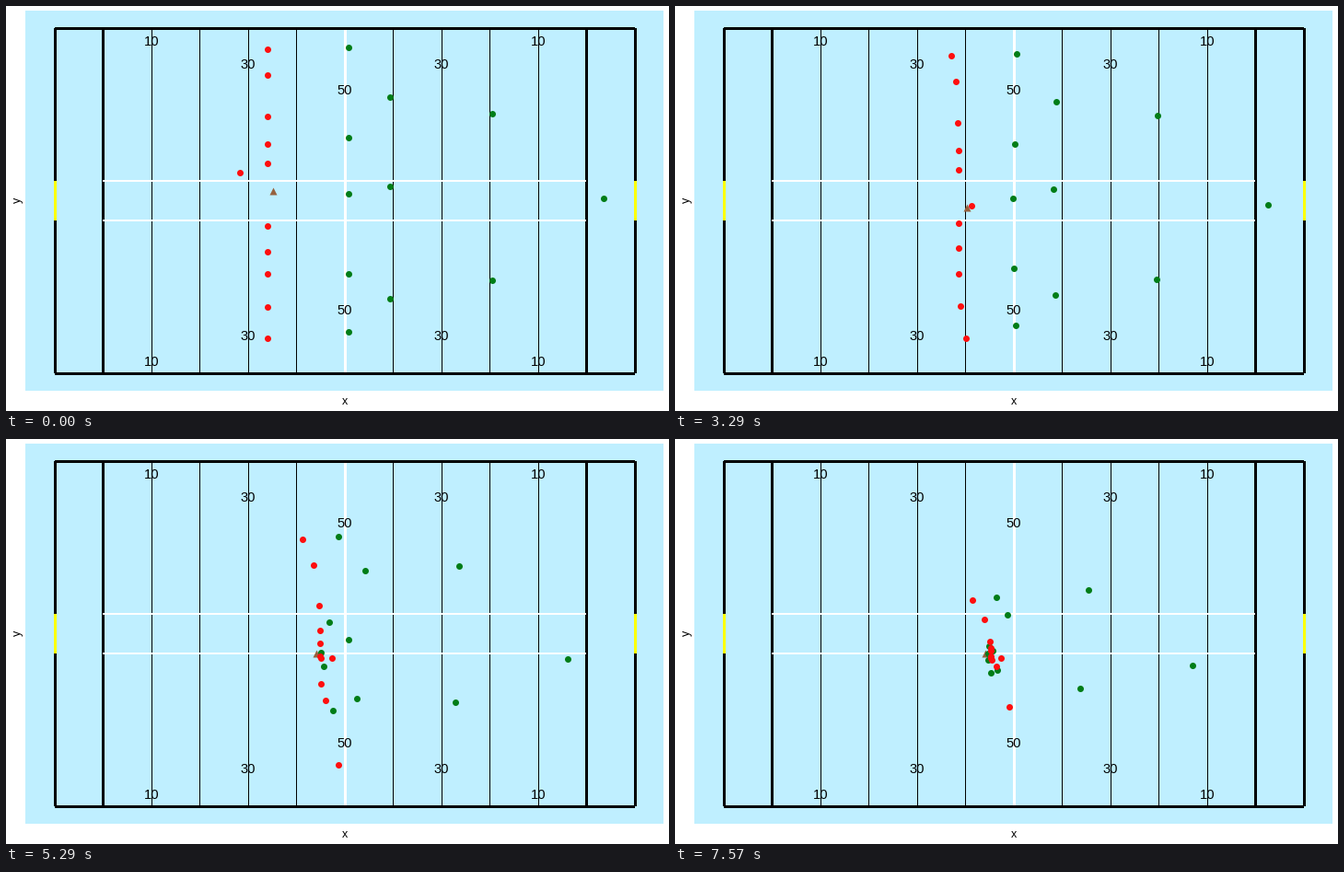
A matplotlib script that plays this animation: 720 by 440 pixels, repeating every 7710 ms.

```python
import numpy as np
import matplotlib.pyplot as plt
from matplotlib.animation import FuncAnimation
from matplotlib.patches import Rectangle

W, H, DPI = 720, 440, 100
LOOP, POSES, TICK = 7710, 54, 30      # ms, poses per loop, ms per frame
PX = 72 / DPI
RED, GREEN, BROWN = "#ff0e0e", "#007d17", "#96623f"

plt.rcParams["font.family"] = "Liberation Sans"
fig = plt.figure(figsize=(W / DPI, H / DPI), dpi=DPI, facecolor="white")
ax = fig.add_axes([0, 0, 1, 1])
ax.set(xlim=(0, W), ylim=(H, 0))
ax.axis("off")


# ---- field ----

def box(x0, y0, x1, y1, color):
    ax.add_patch(Rectangle((x0, y0), x1 - x0, y1 - y0, fc=color, lw=0,
                           antialiased=False))


def label(x, y, text):
    ax.text(x, y + 5, text, size=14.7 * PX, ha="center", va="baseline", zorder=2)


def yard_x(yards):
    return int(53 + 5.25 * yards)


def draw_field():
    box(21, 5, 714, 418, "#bfefff")
    for yards in range(20, 110, 10):
        if yards != 60:
            box(yard_x(yards), 24, yard_x(yards) + 1, 399, "black")
    box(367, 24, 370, 399, "white")
    for x in (52, 104, 629, 682):
        box(x, 24, x + 3, 399, "black")
    for y in (23, 398):
        box(53, y, 683, y + 3, "black")
    for y in (189, 232):
        box(105, y, 630, y + 2, "white")
    for x in (52, 682):
        box(x, 190, x + 3, 233, "yellow")

    for yards, top, bottom in ((10, 38, 386), (30, 63, 358), (50, 91, 330)):
        for x in {yard_x(10 + yards), yard_x(110 - yards)}:
            label(x, top, str(yards))
            label(x, bottom, str(yards))
    ax.text(368, 433, "x", size=12.5 * PX, ha="center", va="baseline")
    ax.text(12.5, 210.5, "y", size=12.5 * PX, rotation=90,
            ha="center", va="center")


# ---- motion, with t counted in poses ----

def smoothstep(t, start, length):
    u = np.clip((t - start) / length, 0, 1)
    return u * u * (3 - 2 * u)


def closing(t, gap, speed, lag=0):
    """Share of the gap covered: speed up, run, then slow down on arrival."""
    s = np.maximum(t - 16 - lag, 0)
    d = speed * np.where(s < 16, s * s / 32, s - 8) / gap
    return d / (1 + d ** 4) ** 0.25


def pile_y(y):
    """Players keep a little of their order when they bunch up."""
    return 234 + 0.07 * (y - 215)


def ball(t):
    go = smoothstep(t, 12, 20)
    return [[290 + 47 * go, 201 + 32 * go]]


KICK_Y = np.array([47, 75, 120, 150, 171, 239, 267, 291, 327, 361])
KICK_LAG = np.array([0, 0, 0, 0, 0, 0, 2, 8, 4, 14])


def kickers(t):
    # the line advances together; the top man hangs back, the bottom one overruns
    depth = 59 + 20 * ((KICK_Y - 204) / 157) ** 5
    x = 284 + depth * smoothstep(t, 10, 30)
    gap = pile_y(KICK_Y) - KICK_Y
    y = KICK_Y + gap * closing(t, abs(gap), 4.8, KICK_LAG)
    u = min(t / 34, 1)
    return [*zip(x, y), (254 + 100 * u, 181 + 57 * u ** 1.2)]


# line x, running speed, player heights
RETURN_LINES = ((372, 4.8, (45, 143, 204, 291, 354)),
                (417, 4.0, (99, 196, 318)),
                (528, 3.2, (117, 298)))


def returners(t):
    spots = []
    for x, speed, heights in RETURN_LINES:
        for y in heights:
            dx, dy = 340 - x, pile_y(y) - y
            go = closing(t, np.hypot(dx, dy), speed)
            spots.append((x + dx * go, y + dy * go))
    deep = 649 - 309 * closing(t, 309, 3)
    spots.append((deep, 209 + 37 * smoothstep(t, 14, 32)))
    return spots


# ---- animation ----

def marks(color, marker="o", size=7):
    return ax.scatter([], [], s=(size * PX) ** 2, c=color, marker=marker,
                      linewidths=0, antialiased=False, zorder=3)


draw_field()
groups = [(marks(BROWN, "^", 8), ball),
          (marks(GREEN), returners),
          (marks(RED), kickers)]


def update(i):
    # show the pose that falls due within this tick
    t = (i * TICK + 25) * POSES // LOOP
    for dots, place in groups:
        dots.set_offsets(np.round(place(t)) + [-0.5, 0.5])
    return [dots for dots, _ in groups]


anim = FuncAnimation(fig, update, frames=LOOP // TICK, interval=TICK,
                     repeat=True, repeat_delay=0, blit=False)
plt.show()
```
